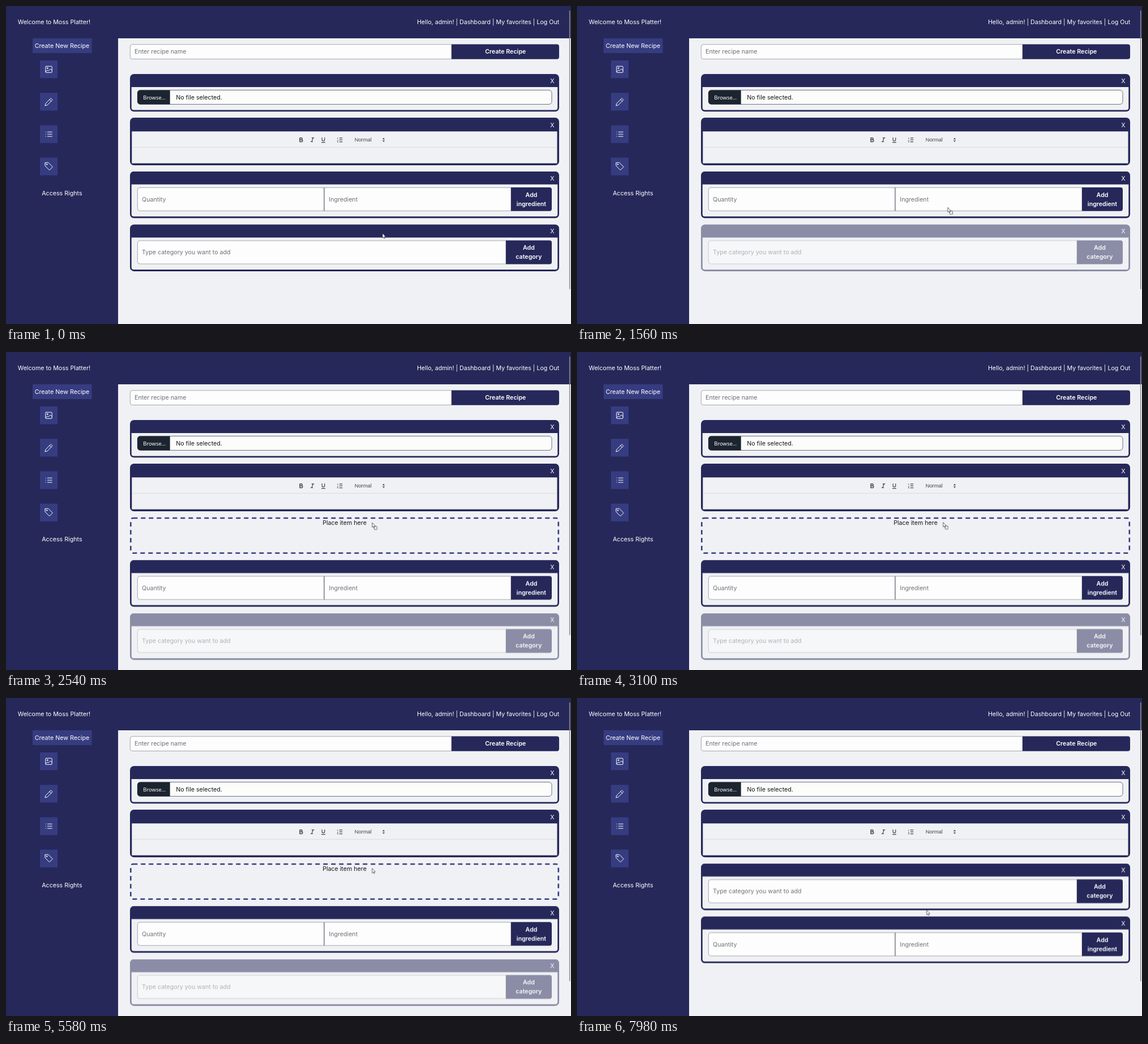
Animation of 998x561 px, one loop 8 s. Source, as an HTML page:

```html
<!DOCTYPE html>
<html lang="en">
<head>
<meta charset="utf-8">
<title>Recipe editor</title>
<style>
  :root { --navy: #26285a; --indigo: #363c80; --page: #eff1f4; }
  html, body { margin: 0; width: 100%; height: 100%; overflow: hidden; background: var(--page); }
  svg { display: block; }
  text { font: 10.67px Inter, sans-serif; fill: #fff; white-space: pre; }
  .navy { fill: var(--navy); }
  .indigo { fill: var(--indigo); }
  .page { fill: var(--page); }
  .field { fill: #fdfdfd; stroke: #85868f; stroke-width: .7; }
  .hint { fill: #707178; }
  .dark { fill: #16171c; }
  .bold { font-weight: 600; text-anchor: middle; }
  .mid { text-anchor: middle; }
  .end { text-anchor: end; }
  .icon { fill: none; stroke: #fff; stroke-width: 1; stroke-linecap: round; stroke-linejoin: round; }
  .tool { fill: none; stroke: #444; stroke-width: 1.2; stroke-linecap: round; stroke-linejoin: round; }

  .category { animation: category 8s step-end infinite; }
  .ingredient { animation: ingredient 8s step-end infinite; }
  .slot { animation: slot 8s step-end infinite; }
  .badge { animation: badge 8s step-end infinite; }
  .pointer { animation: pointer 8s linear infinite; }

  @keyframes category {
    0% { transform: translateY(385.4px); opacity: 1; }
    12.5% { transform: translateY(385.4px); opacity: .5; }
    23.2% { transform: translateY(460.6px); opacity: .5; }
    77.5%, 100% { transform: translateY(291.8px); opacity: 1; }
  }
  @keyframes ingredient {
    0% { transform: translateY(291.8px); }
    23.2% { transform: translateY(367px); }
    77.5%, 100% { transform: translateY(385.4px); }
  }
  @keyframes slot {
    0% { opacity: 0; }
    23.2% { opacity: 1; }
    77.5%, 100% { opacity: 0; }
  }
  @keyframes badge {
    0% { opacity: 0; }
    12.5% { opacity: 1; }
    66.5%, 100% { opacity: 0; }
  }
  @keyframes pointer {
    0%, 11.5% { transform: translate(665px, 401px); }
    19.5% { transform: translate(655px, 355.5px); }
    26.25% { transform: translate(648.5px, 315.5px); }
    32%, 87% { transform: translate(646.8px, 300.5px); }
    97%, 100% { transform: translate(617.7px, 374.3px); }
  }
</style>
</head>
<body>
<svg width="998" height="561" viewBox="0 0 998 561">
  <defs>
    <g id="frame">
      <rect class="navy" x="219" width="758" height="82.5" rx="7"/>
      <path class="page" d="M221.7 23H974.3V75.5a4 4 0 0 1-4 4H225.7a4 4 0 0 1-4-4Z"/>
      <text class="mid" x="964.8" y="16">X</text>
    </g>
  </defs>

  <rect class="page" width="998" height="561"/>
  <path class="navy" d="M0 0H998V57H198V561H0Z"/>
  <text x="20.7" y="32.3">Welcome to Moss Platter!</text>
  <text class="end" x="977.3" y="32.3">Hello, admin! | Dashboard | My favorites | Log Out</text>

  <rect class="indigo" x="47" y="57" width="104.5" height="26"/>
  <text class="mid" x="99" y="74">Create New Recipe</text>
  <path class="indigo" d="M60 96h31v31.3h-31zM60 153.2h31v31.3h-31zM60 210.4h31v31.3h-31zM60 267.5h31v31.3h-31z"/>
  <g class="icon">
    <rect x="69.8" y="106.3" width="11.4" height="11" rx="1.2"/>
    <circle cx="73.2" cy="109.6" r="1.1"/>
    <path d="M70 115.8l3.2-2.6 1.8 1.2 3-3.2 3.2 2.2"/>
    <path d="M69 175.5l1.2-3.8 8.4-8.4q.7-.7 1.4 0l1.5 1.5q.7.7 0 1.4l-8.4 8.4ZM76.8 165.1l2.9 2.9"/>
    <path d="M73.3 222.2h8M73.3 226.1h8M73.3 230h8M70 222.2h.2M70 226.1h.2M70 230h.2"/>
    <path d="M69 277v4.9l7 7q.7.7 1.4 0l4.3-4.3q.7-.7 0-1.4l-7-7h-4.9q-.8 0-.8.8Z"/>
    <circle cx="72" cy="279.4" r=".9"/>
  </g>
  <text class="mid" x="98.9" y="333.5">Access Rights</text>

  <path class="field" d="M787 67.8H223.3a4 4 0 0 0-4 4V89.5a4 4 0 0 0 4 4H787Z"/>
  <path class="navy" d="M787 67.4H973a4 4 0 0 1 4 4V89.8a4 4 0 0 1-4 4H787Z"/>
  <text class="hint" x="227" y="84.3">Enter recipe name</text>
  <text class="bold" x="882.3" y="84.3">Create Recipe</text>

  <g transform="translate(0 120)">
    <rect class="navy" x="219" width="758" height="66.3" rx="7"/>
    <path class="page" d="M221.7 23H974.3V59.5a4 4 0 0 1-4 4H225.7a4 4 0 0 1-4-4Z"/>
    <text class="mid" x="964.8" y="16">X</text>
    <rect x="232.3" y="28.4" width="731.7" height="25" rx="5" fill="#fcfdfa" stroke="#4a4b6c" stroke-width=".8"/>
    <path fill="#1c2430" d="M289.7 28.4H237a5 5 0 0 0-5 5V48.4a5 5 0 0 0 5 5H289.7Z"/>
    <text x="242.3" y="44.6" style="font: 9.4px 'Noto Sans', sans-serif">Browse…</text>
    <text class="dark" x="300.2" y="44.8">No file selected.</text>
  </g>

  <g transform="translate(0 197)">
    <rect class="navy" x="219" width="758" height="84" rx="7"/>
    <path class="page" d="M222.3 24.2H973.5V80.6H222.3Z"/>
    <path d="M222.3 52.3H973.5" stroke="#d2d3d8" stroke-width=".7"/>
    <text class="mid" x="964.8" y="16.7">X</text>
    <g class="tool">
      <path d="M519 35.7h2.6a1.6 1.6 0 0 1 0 3.3h-2.6ZM519 39h3.2a1.75 1.75 0 0 1 0 3.5h-3.2Z" stroke-width="1.4"/>
      <path d="M540.3 35.7h3.6M538.3 42.5h3.6M542.2 35.7l-2.2 6.8"/>
      <path d="M558.2 35.4v3.3a2.3 2.3 0 0 0 4.6 0v-3.3M557.5 43.6h6"/>
      <path d="M589.2 35.8h4.6M589.2 39.2h4.6M589.2 42.6h4.6"/>
      <path d="M585.8 35.5v2.2M585.2 40.2h1.3l-1.3 2.8h1.4" stroke-width=".7"/>
    </g>
    <text x="615.7" y="42.2" style="font: 500 9.33px 'Liberation Sans', sans-serif; fill: #444">Normal</text>
    <path fill="#444" d="M664.8 38.2l2.2-2.6 2.2 2.6ZM664.8 40.2l2.2 2.6 2.2-2.6Z"/>
  </g>

  <g class="slot">
    <rect x="220.3" y="293" width="755.5" height="61.8" rx="4" fill="none" stroke="#363c80" stroke-width="2.6" stroke-dasharray="8 6"/>
    <text class="dark mid" x="598" y="305.4">Place item here</text>
  </g>

  <g class="ingredient">
    <use href="#frame"/>
    <path class="field" d="M562 28.6H236.3a4 4 0 0 0-4 4V65.6a4 4 0 0 0 4 4H562Z"/>
    <path class="field" d="M562 28.6H892V69.6H562Z"/>
    <path d="M562 28.6V69.6" stroke="#6c6d7c" stroke-width="1"/>
    <path class="navy" d="M892 28.2H960a4 4 0 0 1 4 4V66a4 4 0 0 1-4 4H892Z"/>
    <text class="hint" x="240" y="52.8">Quantity</text>
    <text class="hint" x="570.3" y="52.8">Ingredient</text>
    <text class="bold" x="928" y="44.9">Add</text>
    <text class="bold" x="928" y="60.8">ingredient</text>
  </g>

  <g class="category">
    <use href="#frame"/>
    <path class="field" d="M883 28.6H236.3a4 4 0 0 0-4 4V65.6a4 4 0 0 0 4 4H883Z"/>
    <path class="navy" d="M883 28.2H960a4 4 0 0 1 4 4V66a4 4 0 0 1-4 4H883Z"/>
    <text class="hint" x="240" y="52.8">Type category you want to add</text>
    <text class="bold" x="923.4" y="44.9">Add</text>
    <text class="bold" x="923.4" y="60.8">category</text>
  </g>

  <path d="M995.7 8V499.5" stroke="#8b8c96" stroke-width="1.6"/>

  <g class="pointer" fill="#fff" stroke="#22232c" stroke-width=".7" stroke-linejoin="round">
    <path d="M0 0V8.2L1.8 6.6 3 9.2 4.3 8.6 3.2 6.1H5.6Z"/>
    <rect class="badge" x="3.6" y="6.6" width="4.8" height="5.4" rx=".6"/>
  </g>
</svg>
</body>
</html>
```
